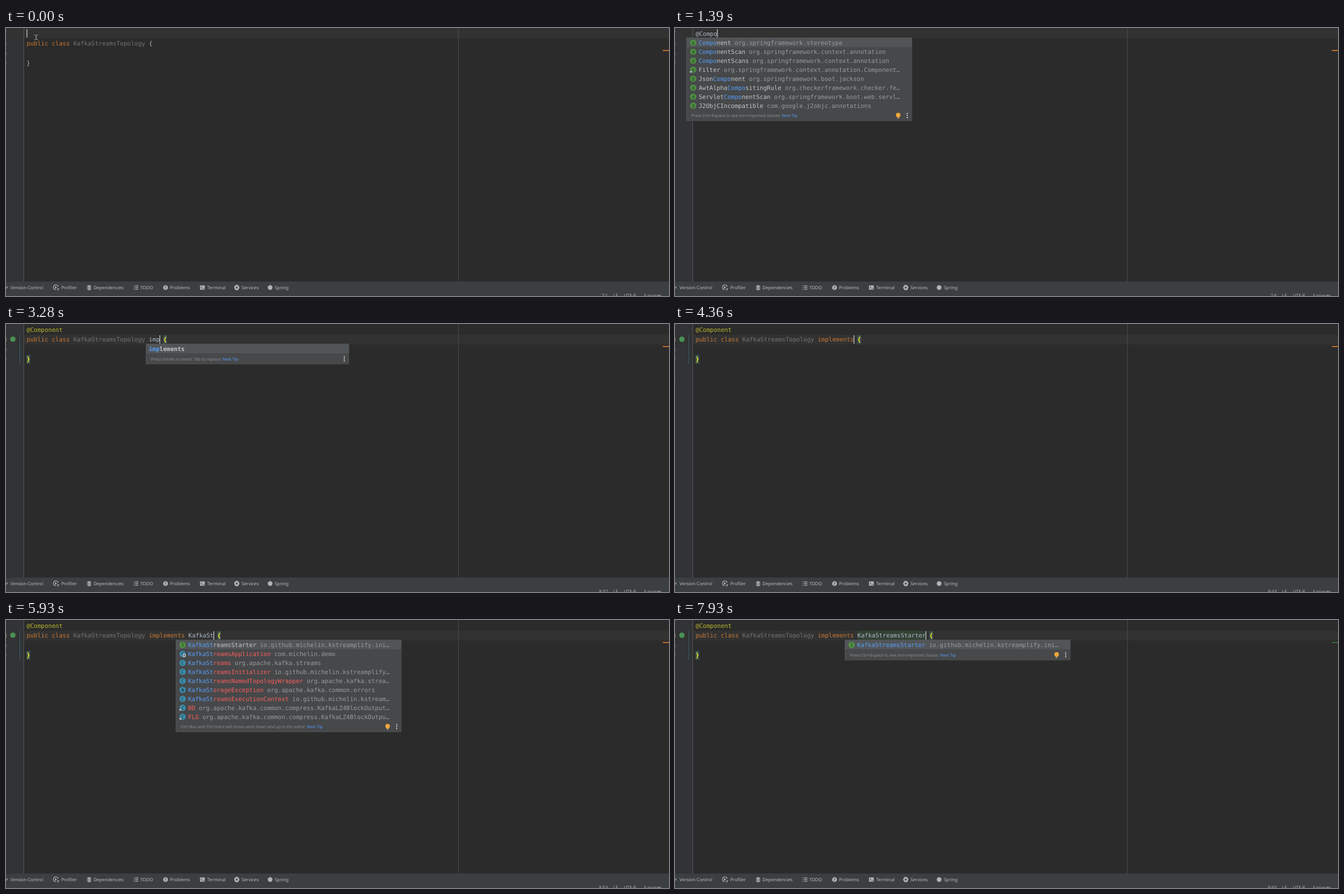
These frames come from a looping animation (1176 by 476 pixels, 8000 ms). An HTML page:

```html
<!DOCTYPE html>
<html lang="en">
<head>
<meta charset="utf-8">
<title>Code completion</title>
<style>
html, body { margin: 0; width: 100%; height: 100%; overflow: hidden; background: #2b2b2b; }
svg { display: block; width: 100%; height: 100%; }
text { white-space: pre; text-rendering: geometricPrecision; }
.m { font: 10.6px "DejaVu Sans Mono", monospace; }
.u { font: 8px "Noto Sans", sans-serif; }
.b { font-weight: bold; }
</style>
</head>
<body>
<svg id="stage" viewBox="0 0 1176 476">
  <defs><clipPath id="clip"><rect id="clipBox"/></clipPath></defs>
  <g id="editor"></g>
  <g id="popup"></g>
  <g id="bar"></g>
</svg>
<script>
const LOOP = 8000, CW = 6.38, X0 = 36.5, ROW = 15.95;
const $ = id => document.getElementById(id);
const TEXT = '#a9b7c6', KEY = '#cc7832', DIM = '#72737a', BLUE = '#589df6', UI = '#afb1b3';

const rect = (x, y, w, h, fill) =>
  `<rect x="${x}" y="${y}" width="${w}" height="${h}" fill="${fill}"/>`;
const disc = (x, y, r, fill) => `<circle cx="${x}" cy="${y}" r="${r}" fill="${fill}"/>`;
const path = (d, stroke, w = 1, fill = 'none') =>
  `<path d="${d}" stroke="${stroke}" stroke-width="${w}" fill="${fill}"/>`;
const text = (x, y, s, fill, cls = 'm', more = '') =>
  `<text x="${x}" y="${y}" fill="${fill}" class="${cls}" ${more}>${s}</text>`;
const span = (s, fill) => s && `<tspan fill="${fill}">${s}</tspan>`;
const colX = c => X0 + c * CW;

// Key presses: each time adds one character of the string.
const typing = (s, times) => times.map((t, i) => [t, s.slice(0, i + 1)]);
const ANNOT = typing('@Component', [70, 270, 530, 920, 1130, 1300, 1600, 1740, 1800, 1990]);
const IMPL = [
  ...typing('implemen', [2870, 3080, 3210, 3500, 3680, 3750, 3820, 4030]),
  [4360, 'implements'], [4430, 'implements '],
  ...typing('KafkaStreamsStarter', [4700, 4910, 5050, 5180, 5310, 5720, 5820, 6050, 6200, 6340,
    6490, 6690, 6900, 7100, 7240, 7380, 7520, 7590, 7720]).map(([t, s]) => [t, 'implements ' + s])
];
const at = (keys, t) => keys.reduce((s, k) => t >= k[0] ? k[1] : s, '');

const ACCEPT = 2400, DOWN = 2530, SPACE = 2670;
function caretAt(t) {
  if (t < DOWN) return [7, at(ANNOT, t).length];
  return [8, t < SPACE ? 33 : 34 + at(IMPL, t).length];
}

// Suggestions: kind|name|package
const list = s => s.trim().split('\n').map(l => l.trim().split('|'));
const SF = 'org.springframework.', CK = 'org.checkerframework.checker.', AK = 'org.apache.kafka.';
const MK = 'io.github.michelin.kstreamplify';
const C = list(`
  @|C|${CK}units.qual
  @|Component|${SF}stereotype
  @|Controller|${SF}stereotype
  j|Cacheable|${SF}cache.annotation
  j|Category|jdk.jfr
  @|CacheConfig|${SF}cache.annotation
  @|CacheEvict|${SF}cache.annotation
  @|CachePut|${SF}cache.annotation
  @|Caching|${SF}cache.annotation
  j|Callback|io.swagger.v3.oas.annotations.callbacks
  @|CalledMethods|${CK}builder.qual
  @|CalledMethods|${CK}calledmethod…`);
const COMPO = list(`
  @|Component|${SF}stereotype
  @|ComponentScan|${SF}context.annotation
  @|ComponentScans|${SF}context.annotation
  f|Filter|${SF}context.annotation.Component…
  @|JsonComponent|${SF}boot.jackson
  @|AwtAlphaCompositingRule|${CK}fe…
  @|ServletComponentScan|${SF}boot.web.servl…
  @|J2ObjCIncompatible|com.google.j2objc.annotations`);
const CO = [C[1], C[2], ...list(`
  @|Configuration|${SF}context.annotation
  @|ControllerAdvice|${SF}web.bind.annotation
  @|ComponentScan|${SF}context.annotation
  @|ComponentScans|${SF}context.annotation
  @|Conditional|${SF}context.annotation
  @|ConfigurationProperties|${SF}boot.conte…
  @|ConditionalOnBean|${SF}boot.autoconfig…
  @|ConditionalOnClass|${SF}boot.autoconfi…
  j|Contended|jdk.internal.vm.annotation
  @|CookieValue|${SF}web.bind.annotation`)];
const COMPON = COMPO.filter(r => !/Awt|J2/.test(r[1]));
const WORD = [['', 'implements', '']];
const K = list(`
  @|K|${CK}units.qual
  I|KafkaStreamsStarter|${MK}.ini…
  A|KafkaStreamsApplication|com.michelin.demo
  C|KafkaStreams|${AK}streams
  I|KafkaClientSupplier|${AK}streams
  I|KafkaClient|${AK}clients
  I|Key|java.security
  I|KeyEventDispatcher|java.awt
  C|KeyEvent|java.awt.event
  S|Key|java.awt.RenderingHints
  S|Key|${SF}boot.autoconfigure.ssl.SslBundl…
  I|KeyEventPostProcessor|java.awt`);
const KAFKA = [...K.slice(1, 6), ...list(`
  I|KafkaFuture|${AK}common
  C|KafkaConsumer|${AK}clients.consumer
  C|KafkaProducer|${AK}clients.producer
  C|KafkaAdminClient|${AK}clients.admin
  X|KafkaException|${AK}common
  C|KafkaMetric|${AK}common.metrics
  C|KafkaMetricsContext|${AK}common.metrics`)];
const ST = [...K.slice(1, 4), ...list(`
  C|KafkaStreamsInitializer|${MK}…
  C|KafkaStreamsNamedTopologyWrapper|${AK}strea…
  X|KafkaStorageException|${AK}common.errors
  C|KafkaStreamsExecutionContext|io.github.michelin.kstream…
  S|BD|${AK}common.compress.KafkaLZ4BlockOutput…
  S|FLG|${AK}common.compress.KafkaLZ4BlockOutpu…`)];
const STR = ST.filter(r => /Streams/.test(r[1]));

const TIPS = [
  'Ctrl+Bas and Ctrl+Haut will move caret down and up in the editor',
  'Press Ctrl+Espace to see non-imported classes',
  'Press Entrée to insert, Tab to replace'
];

// Popup phases: start, rows, tip, corner icon
const PHASES = [
  [0], [340, C, 0, 'spin'], [630, CO, 0, 'spin'], [860, CO, 0, 'bulb'], [990, COMPO, 0, 'bulb'],
  [1370, COMPO, 1, 'bulb'], [1670, COMPON, 1, 'bulb'], [ACCEPT],
  [2940, WORD, 2], [4360],
  [4770, K, 2], [4980, KAFKA, 2, 'spin'], [5520, KAFKA, 2, 'bulb'], [5790, ST, 0, 'bulb'],
  [6120, STR, 0, 'bulb'], [6970, [K[1]], 1, 'bulb']
];

function icon(kind, x, y) {
  if (!kind) return '';
  const letter = s =>
    text(x, y + 2.9, s, '#2c3a2f', 'm', 'text-anchor="middle" style="font-size:8px"');
  if (kind === 'j')
    return rect(x - 2, y - 5.5, 5.5, 5.5, '#9aa0a3') + rect(x - 1, y - 4, 2, 2, '#46484a') +
      rect(x - 5.5, y, 11.5, 6, '#3f93bd') +
      text(x, y + 5.2, '01', '#233a45', 'm', 'text-anchor="middle" style="font-size:6px"');
  const green = '@fI'.includes(kind);
  let s = disc(x, y, 5.6, green ? '#4f9140' : '#3a8cab');
  if (kind === 'X') s += path(`M${x + 1} ${y - 3.5}l-3 4h4l-2 3`, '#233a45', 1.3);
  else s += letter('@f'.includes(kind) ? '@' : kind === 'I' ? 'I' : 'C');
  if ('fS'.includes(kind))
    s += path(`M${x - 4} ${y + 1}l2.5 2.5l-2.5 2.5l-2.5 -2.5z`, '#46484a', .6, '#b8c4cc');
  if (kind === 'A') s += disc(x + 2.8, y + 3, 3, '#b8c4cc') + disc(x + 2.8, y + 3, 1.2, '#46484a');
  return s;
}

function bulb(x, y) {
  return disc(x, y - 1, 4, '#eda73a') + rect(x - 2, y + 2, 4, 1.6, '#eda73a') +
    rect(x - 1.5, y + 4.2, 3, 1.2, '#a9abad');
}

function spinner(x, y, t) {
  let s = '';
  for (let i = 0; i < 8; i++)
    s += `<path d="M0 -2.4V-5" stroke="#c4c6c8" stroke-width="1.1" opacity="${.25 + i * .1}"
      transform="translate(${x} ${y}) rotate(${(i + Math.floor(t / 70)) * 45})"/>`;
  return s;
}

function popup(t) {
  const [, rows, tip, corner] = PHASES.reduce((p, q) => t >= q[0] ? q : p);
  if (!rows) return '';
  const first = t < ACCEPT, word = rows === WORD;
  const x = first ? 20 : word ? 248 : 301, y = first ? 18 : 36, w = word ? 360 : 400;
  const n = Math.min(rows.length, 11.5), h = n * ROW, right = x + w, my = y + h + 10;
  const query = first ? at(ANNOT, t - 70).slice(1) : at(IMPL, t - 70).split(' ').pop();
  const tx = x + (word ? 5.2 : 21.9);
  const box = $('clipBox');
  Object.entries({ x, y, width: w, height: h }).forEach(([k, v]) => box.setAttribute(k, v));

  let s = rect(x, y - 1, w + .5, h + 20.5, '#515456') + rect(x + 1, y, w - 1, h + 18.7, '#46484a');
  s += rect(x + 1, y, w - (n > 11 ? 9 : 1), ROW, '#525558') + '<g clip-path="url(#clip)">';
  rows.forEach(([kind, name, pkg], i) => {
    const cy = y + 8.3 + i * ROW;
    const rest = kind && 'CASX'.includes(kind) ? '#fa5f5c' : '#c3c5c7';
    const k = query ? name.indexOf(query) : -1;
    const label = k < 0 ? span(name, rest) :
      span(name.slice(0, k), rest) + span(query, BLUE) + span(name.slice(k + query.length), rest);
    s += icon(kind, x + 12.3, cy) +
      text(tx, cy + 3.7, label + span(pkg && ' ' + pkg, '#999b9d'), rest, word ? 'm b' : 'm');
  });
  s += '</g>';
  if (n > 11) s += rect(right - 8, y + .5, 7, 20.5, '#66696b');
  s += text(x + 8.9, my + 2.6, TIPS[tip] + `<tspan dx="2.7" fill="${BLUE}">Next Tip</tspan>`,
    '#8b8d8f', 'u', 'style="font-size:7.25px"');
  for (const d of [-3.6, 0, 3.6]) s += rect(right - 9, my + d - 1.1, 2, 2, '#c4c6c8');
  if (corner === 'bulb') s += bulb(right - 24.1, my);
  if (corner === 'spin') s += spinner(right - 22.7, my, t);
  return s;
}

function editor(t) {
  const [line, col] = caretAt(t), top = line === 7 ? 0 : 19, h = line === 7 ? 18.5 : 17.3;
  const ann = at(ANNOT, t), ins = at(IMPL, t), done = t >= ACCEPT;
  const marked = (t >= 2070 && t < DOWN) || t >= 7860;
  let s = rect(0, 0, 31, 450, '#313335') + rect(0, top, 1176, h, '#323232') +
    rect(31, 0, 1, 450, '#555555') + rect(802, 0, 1, 450, '#4a4a4a');
  for (let i = 0; i < 6; i++)
    s += text(1.6, 13.4 + i * 17.65, (7 + i) % 10, i + 7 === line ? '#a4a3a3' : '#606366', 'm',
      'text-anchor="end"');
  if (t >= 2600)
    s += disc(12.2, 27, 4.8, '#4a8f55') + rect(24, 19, 1, 52, '#3d5a6c');

  if (marked) s += line === 7 ? rect(X0, 2, 10 * CW, 16, '#344134') :
    rect(colX(45), 19, 19 * CW, 17, '#344134');
  s += text(X0, 13.5, ann, done ? '#bbb529' : TEXT);

  s += text(X0, 31.4, 'public class ', KEY) + text(colX(13), 31.4, 'KafkaStreamsTopology', DIM);
  if (ins) {
    const full = ins.startsWith('implements');
    s += text(colX(34), 31.4, ins.slice(0, 10), full ? KEY : TEXT) +
      text(colX(45), 31.4, ins.slice(11), TEXT);
  }
  const open = colX(t < SPACE ? 34 : 35 + ins.length);
  const hot = line === 8;
  const brace = (x, base, c) => (hot ? rect(x - .3, base - 11.6, CW + .4, 16, '#3b514d') : '') +
    text(x, base, c, hot ? '#ffef28' : TEXT, hot ? 'm b' : 'm');
  s += brace(open, 31.4, '{') + brace(X0, 66.3, '}');

  s += rect(colX(col) - (col ? .3 : 0), line === 7 ? 2 : 20, 1.2, 15, '#d0d0d0');
  if (t < 70)
    s += path('M50.5 12.5h2q1 0 1 1v6q0 1 -1 1h-2M56.5 12.5h-2q-1 0 -1 1v6q0 1 1 1h2', '#b9b9b9', .9);
  s += rect(1165, 39, 11, 2, marked ? '#3a6b40' : '#be7028');
  return s;
}

const TOOLS = [['Version Control', 8], ['Profiler', 98], ['Dependencies', 155.2], ['TODO', 238],
  ['Problems', 290.7], ['Terminal', 356.7], ['Services', 417.7], ['Spring', 476.7]];
const layer = y => path(`M142.5 ${y}l5 -2.3l5 2.3l-5 2.3z`, '#3c3f41', .6, UI);
const TOOLBAR = rect(0, 450, 1176, 26, '#3c3f41') + rect(0, 450, 1176, .7, '#323537') +
  TOOLS.map(([s, x]) => text(x, 464.4, s, '#bbbbbb', 'u')).join('') +
  path('M0 463l2.5 -4', UI, 1.4) +
  path('M92.5 459.5a4.2 4.2 0 1 0 -4 5.2', UI, 1.2) + path('M87 458.3v5l3.5 -2.5z', 'none', 0, UI) +
  path('M90 463.2h3.5l-2 3', UI, 1.1) +
  [464, 461.3, 458.6].map(layer).join('') +
  [458, 461, 464].map(y => rect(226.5, y - .6, 1.4, 1.3, UI) + rect(229, y - .6, 5.8, 1.3, UI)).join('') +
  disc(283, 461, 4.3, UI) + rect(282.4, 458.3, 1.2, 3.2, '#3c3f41') + rect(282.4, 462.3, 1.2, 1.2, '#3c3f41') +
  rect(344, 457.2, 8.6, 7.6, UI) + path('M345.5 459l2 1.7l-2 1.7M348.5 463h3', '#3c3f41', 1) +
  path('M407 456.7h4.6l2.4 4.3l-2.4 4.3h-4.6l-2.4 -4.3z', UI, .5, UI) +
  path('M408 458.8v4.4l3.6 -2.2z', 'none', 0, '#3c3f41') +
  disc(468.5, 461, 4.2, UI);

function toolbar(t) {
  const [line, col] = caretAt(t - 100), y = 478.3;
  return TOOLBAR + text(1067.5, y, `${line}:${col + 1}`, UI, 'u', 'text-anchor="end"') +
    text(1077, y, 'LF', UI, 'u') + text(1096, y, 'UTF-8', UI, 'u') + text(1131, y, '4 spaces', UI, 'u');
}

const shown = {};
function put(id, html) {
  if (shown[id] !== html) $(id).innerHTML = shown[id] = html;
}

function render(now) {
  const t = now % LOOP;
  put('editor', editor(t));
  put('popup', popup(t));
  put('bar', toolbar(t));
}

const start = performance.now();
function tick() {
  render(performance.now() - start);
  requestAnimationFrame(tick);
}
tick();
</script>
</body>
</html>
```
